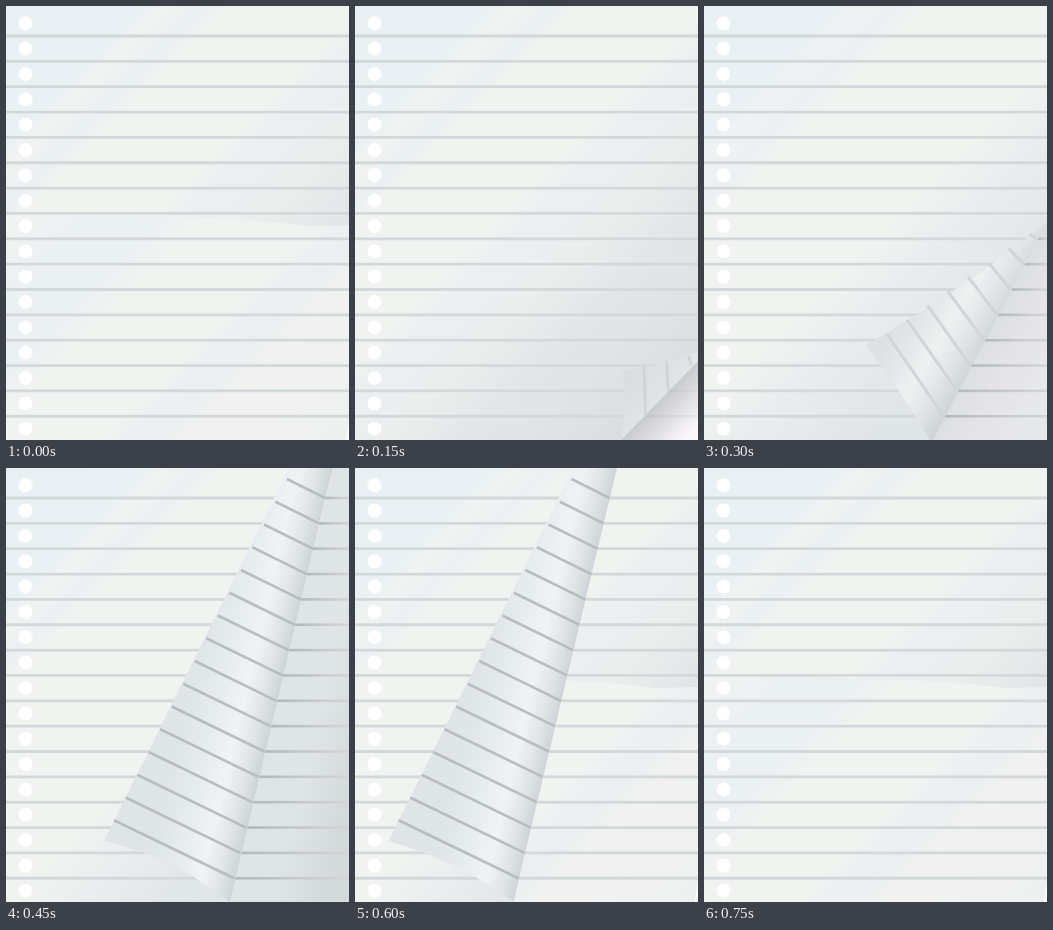
Write an HTML page that moves like this. It is 343 by 434 pixels and loops after 0.9 s.

```html
<!DOCTYPE html>
<html lang="en">
<head>
<meta charset="utf-8">
<title>Turning page</title>
<style>
html, body { margin: 0; width: 100%; height: 100%; overflow: hidden; background: #f1f3f0; }
svg { display: block; width: 100%; height: 100%; }
.pose { visibility: hidden; animation: show 900ms step-end infinite; }
@keyframes show {
  0% { visibility: visible; }
  16.6667%, 100% { visibility: hidden; }
}
</style>
</head>
<body>
<svg id="stage" viewBox="0 0 343 434" preserveAspectRatio="none"></svg>
<script>
const W = 343, H = 434, ROW = 25.35, FIRST = 30, DURATION = 900, STEP = 150;
const rowY = i => FIRST + ROW * i;
const repeat = (n, draw) => Array.from({ length: n }, (_, i) => draw(i)).join('');

const stops = list => list.trim().split(/\s+/).map(s => {
  const [at, color] = s.split('#');
  return `<stop offset="${at}" stop-color="#${color}"/>`;
}).join('');
const gradient = (id, x1, y1, x2, y2, list) =>
  `<linearGradient id="${id}" gradientUnits="userSpaceOnUse" x1="${x1}" y1="${y1}" x2="${x2}" y2="${y2}">${stops(list)}</linearGradient>`;
// Paper tints run diagonally from the top left to the bottom right corner.
const tint = (id, list) => gradient(id, 0, 0, 388.5, 388.5, list);
const shape = (d, fill) => `<path d="${d}" fill="url(#${fill})"/>`;
const SHEET = `M0 0H${W}V${H}H0Z`;

const ruling =
  repeat(16, i => `<path d="M0 ${rowY(i)}H${W}" stroke="#d3d8db" stroke-width="2.8"/>`) +
  repeat(17, i => `<circle cx="19.5" cy="${17.2 + ROW * i}" r="7" fill="#fff"/>`);

const defs = `<defs>
  ${tint('shaded', '0#e9f0f3 .18#eaf1f4 .205#f1f3f1 .23#f0f2f1 .245#ebf0f3 .265#ebf0f3 .28#f1f3f0 .46#f1f3f0 .5#ebeff1 .53#ebeff1 .6#eceeed .7#e3e6e8 .8#dfe3e6 .92#d8dce0 1#d6dadd')}
  ${tint('rest', '.26#f2f4f2 .32#eff2f2 .37#ebf0f2 .48#ebf0f2 .52#f1f3f0 .68#f1f3f0 .71#ebf0f2 .75#ebeff1 .79#f1f2f0 1#eef0f0')}
  ${tint('lifted', '0#e9f0f3 .18#eaf1f4 .2#eff2f2 .25#ebf0f3 .28#f1f3f0 .52#f1f3f0 .62#e8ecee .77#e0e5e8 1#dadfe2')}
  ${tint('turned', '0#e9f0f3 .18#eaf1f4 .21#f1f3f1 .25#ebf0f3 .28#f1f3f0 .56#f1f3f0 .66#e9edee .75#e2e7e9 1#dde2e5')}
  ${gradient('curlUnder', 304, 395, 337, 427, '0#c8cacd .4#dddcdf .75#f0edf0 1#faf8fa')}
  ${gradient('curlFlap', 268, 365, 315, 398, '0#d8dcdf .5#dde1e3 1#e3e6e8')}
  ${gradient('cornerUnder', 280, 333, 343, 366, '0#dcdfe2 .4#e4e3e7 1#e7e8eb')}
  ${gradient('cornerFlap', 164, 368, 238, 413, '0#dde1e4 .3#e6e9ea .5#eff1f1 .7#e4e8ea 1#cfd5d8')}
  ${gradient('pageUnder', 228, 300, 343, 328, '0#d2d8db .2#dfe4e7 .6#dfe4e7 1#d4d9dc')}
  ${gradient('pageFlap', 102, 380, 228, 410, '0#dfe4e6 .35#e0e5e8 .62#e9eef0 .76#eff3f5 .9#dfe4e7 1#cfd5d8')}
  <linearGradient id="tail">${stops('0#b2b8bc .5#c3c8cb 1#d2d6d9')}</linearGradient>
</defs>`;

// Ruled lines on the flap go from its free edge to the fold.
function ribs({ first, count, edge, edgeStep, fold, foldStep, color, width }) {
  return repeat(count, i => {
    const x = edge[0] + edgeStep[0] * i, y = edge[1] + edgeStep[1] * i;
    return `<path d="M${x} ${y}L${fold + foldStep * i} ${rowY(first + i)}" stroke="${color}" stroke-width="${width}"/>`;
  });
}
const tails = ({ first, count, fold, foldStep }, opacity = 1) => repeat(count, i => {
  const x = fold + foldStep * i;
  return `<rect x="${x}" y="${rowY(first + i) - 1.3}" width="${W - x}" height="2.6" fill="url(#tail)" opacity="${opacity}"/>`;
});

const curl = {
  first: 13, count: 3, edge: [334, 350], edgeStep: [-22.5, 5.5],
  fold: 336, foldStep: -22.7, color: '#d0d4d7', width: 3
};
const corner = {
  first: 8, count: 8, edge: [325, 228], edgeStep: [-20.3, 14.3],
  fold: 333, foldStep: -13.3, color: '#d0d5d9', width: 3
};
const page = {
  first: 0, count: 16, edge: [281, 11], edgeStep: [-11.53, 22.75],
  fold: 319, foldStep: -6.07, color: '#b7bdc1', width: 2.6
};
const PAGE_FLAP = 'M283 0L98 373Q138 382 182 405L224 434L319 30L327 0Z';

const poses = [
  shape(SHEET, 'shaded') + ruling +
    shape('M266 434L343 355V434Z', 'curlUnder') + tails(curl, .35) +
    shape('M268 365Q312 357 335 349L343 344V355L266 434Q271 400 268 365Z', 'curlFlap') + ribs(curl),

  shape(SHEET, 'lifted') + ruling +
    shape('M342 217L343 216V434H228Z', 'cornerUnder') + tails(corner) +
    shape('M343 216Q300 252 250 284Q215 308 162 339Q192 378 226 434H229Z', 'cornerFlap') + ribs(corner),

  shape(SHEET, 'turned') + ruling +
    shape('M327 0H343V434H222L319 30Z', 'pageUnder') + tails(page) +
    shape(PAGE_FLAP, 'pageFlap') + ribs(page),

  shape('M0 0H262L159 433V434H0Z', 'turned') +
    `<g clip-path="url(#left)">${ruling}</g>` +
    `<g transform="translate(-64.5 0)">${shape('M283 0L98 373Q138 384 182 407L223 433L326.5 0Z', 'pageFlap')}${ribs(page)}</g>`
];

const restingPage = shape(SHEET, 'rest') +
  shape('M0 0H343V219L300 220L275 217Q200 210 70 209L0 208Z', 'shaded') +
  ruling + '<path d="M343 414V434H340Z" fill="#fff"/>';

document.getElementById('stage').innerHTML = defs +
  '<clipPath id="left"><path d="M0 0H262L159 433V434H0Z"/></clipPath>' + restingPage +
  poses.map((art, i) =>
    `<g class="pose" style="animation-delay:${(i + 1) * STEP - DURATION}ms">${art}</g>`).join('');
</script>
</body>
</html>
```
